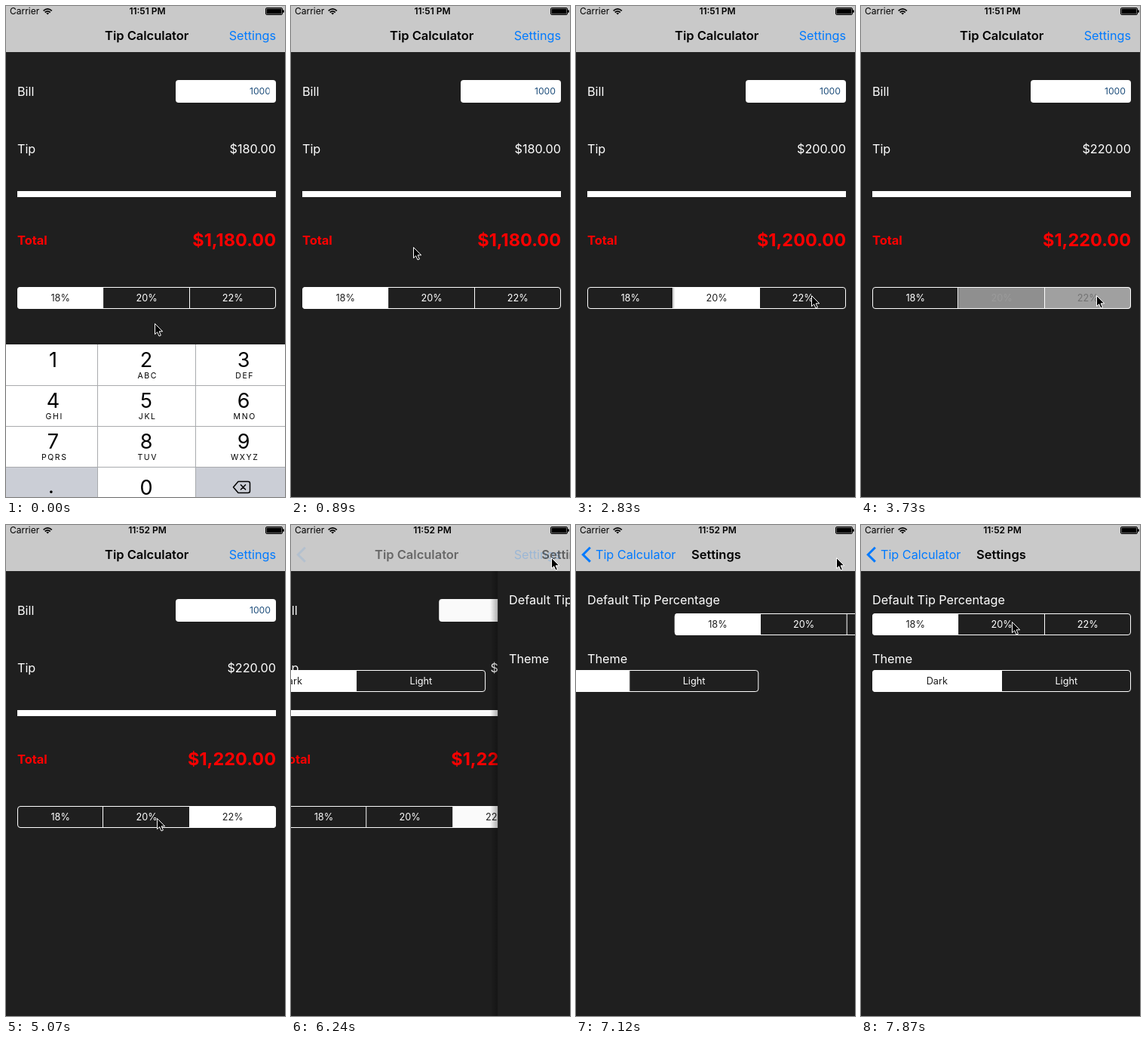
Write an HTML page that moves like this. It is 370x650 px and loops after 8 s.

```html
<!DOCTYPE html>
<html lang="en">
<head>
<meta charset="utf-8">
<title>Tip Calculator</title>
<style>
  html, body { margin: 0; width: 100%; height: 100%; overflow: hidden; background: #1f1f1f; }
  svg { display: block; width: 370px; height: 650px; font-family: Inter, "Open Sans", sans-serif; }
  text { white-space: pre; }
  .label { font-size: 16.2px; fill: #fff; }
  .title { font-size: 16.5px; font-weight: 600; }
  .blue { font-size: 16.2px; fill: #007aff; }
  .red { fill: #f00; font-weight: 700; }
  .end { text-anchor: end; }
  .mid { text-anchor: middle; }
  .segment { font-size: 12.7px; text-anchor: middle; }
  .digit { font-size: 27px; text-anchor: middle; }
  .letters { font-size: 10.5px; letter-spacing: 1.6px; text-anchor: middle; }
</style>
</head>
<body>
<svg viewBox="0 0 370 650">
  <defs>
    <linearGradient id="edge">
      <stop offset="0" stop-color="#000" stop-opacity="0"/>
      <stop offset="1" stop-color="#000" stop-opacity=".3"/>
    </linearGradient>
    <clipPath id="fieldClip"><rect id="fieldRect" x="230" y="100" width="122" height="26"/></clipPath>
  </defs>
  <rect width="370" height="650" fill="#1f1f1f"/>

  <g id="calculator">
    <text class="label" x="15" y="118.5">Bill</text>
    <rect x="225" y="98" width="133" height="30" rx="4" fill="#fff"/>
    <text class="end" x="351" y="117" font-size="12.2" fill="#1f4f7c" clip-path="url(#fieldClip)">1000</text>
    <text class="label" x="15" y="194.5">Tip</text>
    <text class="label end" id="tip" x="358" y="194.5"></text>
    <rect x="15" y="245" width="343" height="8" fill="#fff"/>
    <text class="red" x="15" y="315.5" font-size="16.4">Total</text>
    <text class="red end" id="total" x="358" y="318" font-size="23.5"></text>
    <g id="rates"></g>
  </g>
  <rect id="dim" width="370" height="650"/>

  <g id="settings">
    <rect x="-10" width="10" height="650" fill="url(#edge)"/>
    <rect width="370" height="650" fill="#1f1f1f"/>
    <text class="label" x="15" y="104.5">Default Tip Percentage</text>
    <text class="label" x="15" y="182.5">Theme</text>
    <g id="defaults"></g>
    <g id="themes"></g>
  </g>

  <g id="keyboard"></g>

  <rect width="370" height="61" fill="#c9c9c9"/>
  <text x="5" y="11.2" font-size="12">Carrier</text>
  <g fill="none" stroke="#000" stroke-width="1.7">
    <path d="M49.6 6.3Q55.2 1.4 60.8 6.3M51.7 8.5Q55.2 5.4 58.7 8.5"/>
    <path d="M55.2 11.6l-1.9-2q1.9-1.5 3.8 0z" fill="#000" stroke="none"/>
  </g>
  <text class="mid" id="clock" x="187.5" y="11.3" font-size="12" font-weight="600"></text>
  <rect x="344.5" y="2.5" width="22" height="9" rx="1.5" fill="none" stroke="#000"/>
  <rect x="345.5" y="3.5" width="20" height="7"/>
  <rect x="367" y="5.3" width="1.8" height="3.6" rx=".8"/>
  <g id="back">
    <path d="M18.8 29.8L9.3 39.2L18.8 48.6" fill="none" stroke="#007aff" stroke-width="3"/>
    <text class="blue" id="backLabel" x="26" y="45">Tip Calculator</text>
  </g>
  <text class="title" id="mainTitle" y="45">Tip Calculator</text>
  <text class="blue end" id="settingsButton" x="358" y="45">Settings</text>
  <text class="title" id="settingsTitle" y="45">Settings</text>

  <path id="cursor" d="M.5.5V14.6L3.7 11.7L6 17L8.4 16L6.1 10.8H10.7Z" fill="#000" stroke="#fff" stroke-linejoin="round"/>
</svg>
<script>
const LOOP = 8000;
const $ = id => document.getElementById(id);
const set = (id, attrs) => Object.entries(attrs).forEach(([k, v]) => $(id).setAttribute(k, v));
const move = (id, x, y = 0) => set(id, { transform: `translate(${x} ${y})` });
const clamp = v => Math.min(1, Math.max(0, v));
const smooth = v => { const u = clamp(v); return u * u * (3 - 2 * u); };
const gray = v => `rgb(${v},${v},${v})`;

// Grey levels of a segment: fill, label
const LEVELS = { off: [31, 255], on: [255, 31], press: [66, 190], out: [143, 155], in: [160, 115] };

function buildSegments(id, y, names) {
  const width = 343 / names.length;
  const cells = names.map((_, i) =>
    `<rect x="${15 + i * width}" y="${y}" width="${width}" height="29"/>`).join("");
  const lines = names.slice(1).map((_, i) =>
    `M${Math.round(15 + (i + 1) * width) - .5} ${y}v29`).join("");
  const labels = names.map((name, i) =>
    `<text class="segment" x="${15 + (i + .5) * width}" y="${y + 19}">${name}</text>`).join("");
  $(id).innerHTML = `<clipPath id="${id}Clip"><rect x="15" y="${y}" width="343" height="29" rx="4"/></clipPath>
    <g class="cells" clip-path="url(#${id}Clip)">${cells}</g>${labels}
    <g fill="none" stroke="#fff"><rect x="15.5" y="${y + .5}" width="342" height="28" rx="3.5"/><path d="${lines}"/></g>`;
}

function paintSegments(id, states) {
  const cells = $(id).querySelectorAll(".cells rect");
  const labels = $(id).querySelectorAll("text");
  states.forEach((state, i) => {
    const [fill, label] = LEVELS[state];
    cells[i].setAttribute("fill", gray(fill));
    labels[i].setAttribute("fill", gray(label));
  });
}

function buildKeyboard() {
  const columns = [62.5, 186, 315];
  const letters = ["", "ABC", "DEF", "GHI", "JKL", "MNO", "PQRS", "TUV", "WXYZ"];
  const keys = letters.map((word, i) => {
    const x = columns[i % 3], y = 477.5 + 54 * Math.floor(i / 3);
    return `<text class="digit" x="${x}" y="${y}">${i + 1}</text>
      <text class="letters" x="${x + 1.7}" y="${y + 15.5}">${word}</text>`;
  }).join("");
  $("keyboard").innerHTML = `<rect y="448" width="370" height="202" fill="#fff"/>
    <path d="M0 611H121V650H0zM252 611H370V650H252z" fill="#cbced6"/>
    <path d="M121.5 448V650M251.5 448V650M0 502.5H370M0 556.5H370M0 610.5H370" stroke="#a9abae"/>
    ${keys}<text class="digit" x="186" y="646.5">0</text>
    <text class="digit" x="60" y="645">.</text>
    <path d="M308 629.5H321Q323.5 629.5 323.5 632V642Q323.5 644.5 321 644.5H308L301.5 637ZM311 633.5l7 7m0-7l-7 7"
      fill="none" stroke="#000" stroke-width="1.5" stroke-linejoin="round"/>`;
}

// Time, then x and y of the pointer; off stage where y is negative
const POINTER = [
  [0, 197, 420], [150, 190, 397], [300, 170, 342], [450, 162, 319],
  [1190, 166, 330], [1340, 182, 366], [1490, 192, 383], [2830, 312, 383],
  [4620, 302, 384], [4770, 268, 386], [4920, 226, 388], [5060, 200, 388], [5210, 192, 388],
  [5510, 400, -50], [5800, 345, 43],
  [7420, 330, 62], [7570, 270, 102], [7720, 215, 123], [7870, 200, 128]
];

const RATES = [
  [0, "on off off"], [2390, "on press off"], [2540, "out in off"], [2690, "off on off"],
  [3580, "off on press"], [3730, "off out in"], [3880, "off off on"]
];

const TICKS = [0, 5800, 5950, 6090, 6240, 6390, 6530, 6670, 6820, 6970, 7120, 7270, 7420, 7570, 7720, 7870];

const latest = (rows, t) => rows.filter(row => row[0] <= t).pop();

function render(t) {
  const held = TICKS.filter(tick => tick <= t).pop();
  const push = smooth((held - 6090) / 450);
  const offset = 374 * (1 - smooth((held - 6490) / 1000));
  const [, x, y] = latest(POINTER, t);
  const tip = t < 2540 ? 180 : t < 3730 ? 200 : 220;

  $("tip").textContent = `$${tip}.00`;
  $("total").textContent = `$1,${tip}.00`;
  $("clock").textContent = t < 4320 ? "11:51 PM" : "11:52 PM";
  set("fieldRect", { width: t < 450 ? 119.5 : 122 });
  set("keyboard", { visibility: t < 890 ? "visible" : "hidden" });
  paintSegments("rates", latest(RATES, t)[1].split(" "));

  move("calculator", -111 * push);
  move("settings", 370 * (1 - push));
  set("settings", { visibility: push > 0 ? "visible" : "hidden" });
  set("dim", { opacity: .08 * push });
  move("defaults", offset);
  move("themes", -offset);

  set("mainTitle", { x: 131 - 77 * push, opacity: clamp(1 - 2 * push) });
  set("settingsTitle", { x: 153 + 242 * (1 - push), opacity: clamp(2 * push) });
  set("settingsButton", { opacity: held < 5950 ? 1 : .3 * (1 - push) });
  set("back", { opacity: push < .5 ? push * .4 : push });
  set("backLabel", { opacity: clamp(2 * push - 1) });
  move("cursor", x, y);
}

buildSegments("rates", 372, ["18%", "20%", "22%"]);
buildSegments("defaults", 117, ["18%", "20%", "22%"]);
buildSegments("themes", 192, ["Dark", "Light"]);
paintSegments("defaults", ["on", "off", "off"]);
paintSegments("themes", ["on", "off"]);
buildKeyboard();

const start = performance.now();
function frame() {
  render((performance.now() - start) % LOOP);
  requestAnimationFrame(frame);
}
frame();
</script>
</body>
</html>
```
